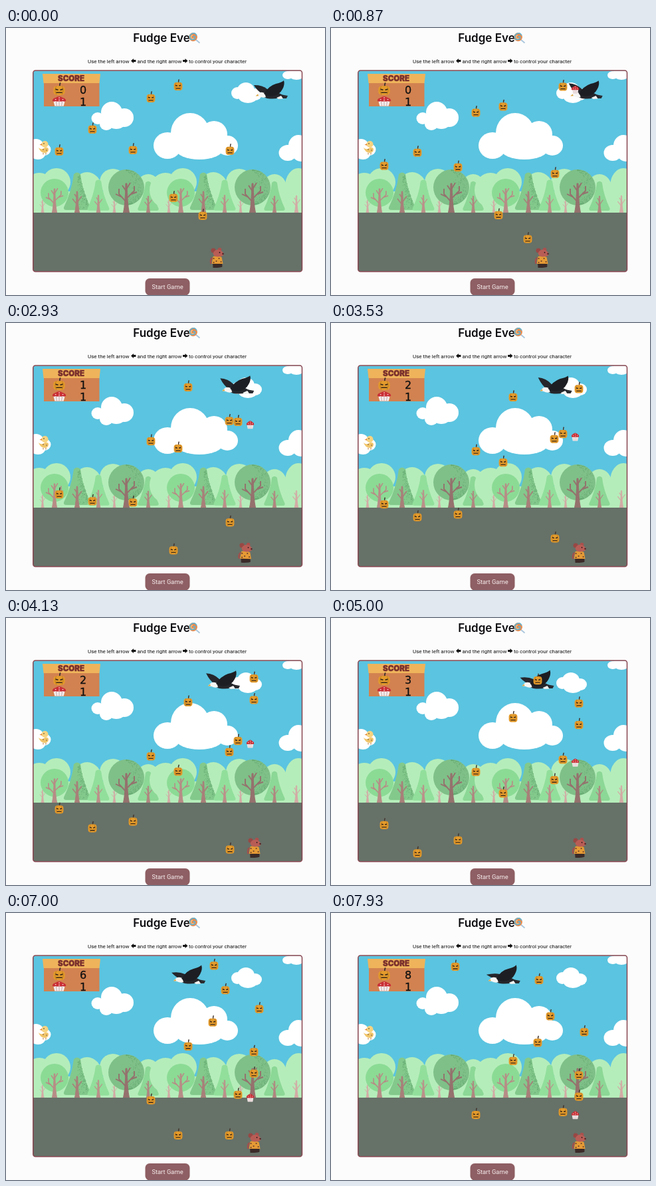
Animation, 480 px wide and 402 px high, one loop 8000 ms. Source, as an HTML page:

```html
<!DOCTYPE html>
<html lang="en">
<head>
<meta charset="utf-8">
<title>Fudge Eve</title>
<style>
  html, body { margin: 0; width: 100%; height: 100%; overflow: hidden; background: #fcfcfc; }
  svg { display: block; width: 100%; height: 100%; }
  .ui { font-family: Roboto, Arial, sans-serif; font-size: 8px; fill: #111; }
  .title { font: 600 17px Inter, "DejaVu Sans", sans-serif; fill: #0c0c10; text-anchor: middle; }
  .head { font: 900 11.5px Inter, "DejaVu Sans", sans-serif; fill: #7a2f2c; stroke: #7a2f2c; stroke-width: .4; text-anchor: middle; }
  .num { font: 16px "DejaVu Sans", sans-serif; fill: #111; stroke: #111; stroke-width: .3; text-anchor: middle; }
  .btn { font: 9.4px Roboto, Arial, sans-serif; fill: #f7eeee; text-anchor: middle; }
</style>
</head>
<body>
<svg viewBox="0 0 480 402" preserveAspectRatio="none">
  <defs>
    <clipPath id="view"><rect x="41" y="64.5" width="404" height="302" rx="3"/></clipPath>
    <g id="pumpkin">
      <path d="M.6-4Q.3-7 1.4-8.6" fill="none" stroke="#43342c" stroke-width="1.5"/>
      <rect x="-6.4" y="-4.3" width="12.8" height="12.2" rx="4" fill="#e39b2b"/>
      <path d="M-3.2-4Q-6 2-3 7.6M3.2-4Q6 2 3 7.6" fill="none" stroke="#bb761d" stroke-width=".7"/>
      <path d="M-4.2-.6L-.9.5-1.2 1.8-4 1.2zM4.2-.6L.9.5 1.2 1.8 4 1.2zM-3.4 4.2H3.4V5.5H-3.4z" fill="#3a2818"/>
    </g>
    <g id="cupcake">
      <path d="M-5-1H5L3.7 6.2H-3.7z" fill="#f6eeee"/>
      <path d="M-2.6-.5L-2 6M0-.5V6M2.6-.5L2 6" stroke="#c9a9aa" stroke-width=".6"/>
      <path d="M-5.6 0Q-6-3-3-4.2Q0-7.4 3-4.2Q6-3 5.6 0Q4.2 1.3 2.8 0Q1.4 1.3 0 0Q-1.4 1.3-2.8 0Q-4.2 1.3-5.6 0z" fill="#c92e35"/>
      <path d="M-3-2h.1M0-4h.1M3-2h.1M0-1.3h.1" stroke="#ffe5df" stroke-width="1.1" stroke-linecap="round"/>
    </g>
    <g id="trunk">
      <path d="M-4.5 0Q-1.6-12-1-44H1Q1.6-12 4.5 0z"/>
      <path d="M0-16L-11-28V-36M0-21L12-33V-40M-6-23L-16-28M7-28L16-31M0-32L-6-41M0-35L6-45" fill="none" stroke-width="1.9"/>
    </g>
    <g id="twig">
      <path d="M-3.6 0Q-1.2-8-.8-32H.8Q1.2-8 3.6 0z"/>
      <path d="M0-12L-7-21M0-15L7-25M0-22L-4-28" fill="none" stroke-width="1.5"/>
    </g>
    <path id="cone" d="M-20-8Q-8-33-5-58Q0-63 5-58Q8-33 20-8Q21-4 16-4H-16Q-21-4-20-8z"/>
  </defs>

  <text class="title" x="234" y="21">Fudge Eve</text>
  <path d="M285 17L291.500 22.500" stroke="#a9c6dc" stroke-width="1.8"/>
  <circle cx="281.500" cy="13.500" r="6.400" fill="#e88a4c"/>
  <path d="M281.500 13.500q2-2 3 .5t-3 3.300t-5-2.800t3.500-6t7 3" fill="none" stroke="#5bb5d8" stroke-width="1.6"/>
  <path d="M281 11q-3 0-2.500 3t4 1.500" fill="none" stroke="#f6d9a4" stroke-width="1"/>

  <g class="ui">
    <text x="123" y="52.500">Use the left arrow</text>
    <text x="197.500" y="52.500">and the right arrow</text>
    <text x="275" y="52.500">to control your character</text>
    <path d="M188 49.500l4-3.400v2h3.400v2.800h-3.400v2zM273.500 49.500l-4-3.400v2h-3.400v2.800h3.400v2z"/>
  </g>

  <g clip-path="url(#view)">
    <rect x="40" y="64" width="406" height="215" fill="#5bc4e0"/>
    <g id="clouds" fill="#fff"></g>
    <g id="chick">
      <path d="M49 180Q53 184 57 181Q62 178 64 182Q64 188 58 188Q51 187 49 180z" fill="#f1c66b"/>
      <circle cx="58.500" cy="175" r="5" fill="#f6d480"/>
      <path d="M54 174l-3.500 1.800 3.700 1.200z" fill="#e58b3d"/>
      <circle cx="57" cy="174" r=".8" fill="#403020"/>
      <path d="M56 188v2.500M60 188v2.500" stroke="#b77a38"/>
      <path d="M55 183h2M60 184h2" stroke="#7a5b45" stroke-width="1.2"/>
    </g>
    <g id="wood"></g>
    <rect x="40" y="278" width="406" height="89" fill="#667168"/>

    <path d="M55 69H142L140.500 83H56.500z" fill="#efb45b"/>
    <rect x="57" y="83" width="83.500" height="35" fill="#d28250"/>
    <text class="head" x="98" y="80.300" textLength="0">SCORE</text>
    <use href="#pumpkin" transform="translate(80 92) scale(1.35 1.1)"/>
    <use href="#cupcake" transform="translate(80 110) scale(1.8 1.2)"/>
    <text class="num" id="score" x="116" y="99">0</text>
    <text class="num" x="116" y="116.500">1</text>

    <g id="eagle">
      <path id="farWing" fill="#25262b"/>
      <path d="M40 22L51 24 49 28 38 28z" fill="#2b2c31"/>
      <path d="M9 20Q20 14 31 18Q40 20 46 25Q34 30 20 28Q12 26 9 20z" fill="#25262b"/>
      <path d="M16 20Q9 17 6 21L3 24 8 25Q14 28 18 26z" fill="#f6f6f4"/>
      <path d="M6 21.500L2.500 24.500 7 24.300z" fill="#dda63d"/>
      <path d="M34 27L41 24 44 28.500 37 29z" fill="#f1f1ef"/>
      <path id="nearWing" fill="#1d1e23"/>
    </g>

    <g id="hero">
      <path d="M-6.500 23H7.500L8 28Q8 30-6 30z" fill="#3a2a28"/>
      <path d="M-6 13Q1 11 7 14L9 24H-8z" fill="#e59a35"/>
      <path d="M-5 16h.1M-1 20h.1M3 16h.1M6 21h.1M-5 22h.1" stroke="#67402c" stroke-width="2" stroke-linecap="round"/>
      <path d="M-7 15Q-11 18-9 24" fill="none" stroke="#a34f4b" stroke-width="2.400"/>
      <circle cx="-5.500" cy="4" r="3.600" fill="#984845"/>
      <circle cx="4" cy="2.500" r="2.800" fill="#a9514d"/>
      <path d="M-6 8Q-3 2 3 3Q8 4 10 9Q10 12 5 13Q-5 15-6 8z" fill="#b85d56"/>
      <circle cx="9" cy="9" r="1.300" fill="#4b2728"/>
      <circle cx="4" cy="7" r=".9" fill="#2c191b"/>
    </g>
    <g id="drops"></g>
  </g>
  <rect x="40.800" y="64" width="404.700" height="302.700" rx="3.500" fill="none" stroke="#87454f" stroke-width="1.500"/>

  <rect x="209.500" y="377" width="67" height="25.500" rx="6.500" fill="#8e5f64"/>
  <text class="btn" x="243" y="393">Start Game</text>
</svg>

<script>
const $ = id => document.getElementById(id);
const LOOP = 8000, STEP = LOOP / 120, FLOOR = 357;

// Scenery
const puffs = [
  [348, 98, 9, 9], [361, 94, 13, 12], [375, 100, 10, 9], [364, 104, 14, 9],
  [424, 71, 8, 6], [437, 69, 13, 9],
  [138, 136, 9.500, 9], [159, 127, 16, 16], [178, 135, 14, 14], [151, 145, 10, 9], [166, 142, 14, 10],
  [243, 177, 21, 20], [277, 158, 29, 30], [313, 160, 20, 20], [333, 177, 16, 15], [291, 182, 36, 16],
  [424, 188, 13.500, 12], [440, 177, 15, 16], [445, 190, 14, 11],
  [45, 181, 13, 14], [58, 183, 9.500, 9], [48, 190, 11, 8]
];
const oval = ([x, y, a, b]) => `<ellipse cx="${x}" cy="${y}" rx="${a}" ry="${b}"/>`;
$('clouds').innerHTML = puffs.map(oval).join('');

let seed = 7;
const rnd = () => (seed = seed * 16807 % 2147483647) / 2147483647;

// Soft stipple along the shaded side of a crown
function stipple(n, width) {
  let d = '';
  for (let i = 0; i < n; i++) {
    const v = rnd(), [x, y] = width(v);
    d += `M${(x * Math.sqrt(rnd())).toFixed(1)} ${y.toFixed(1)}h.1`;
  }
  return `<path d="${d}" stroke="#64a870" stroke-width=".9" stroke-linecap="round"/>`;
}
const roundDots = stipple(190, v => [26 * Math.sin(Math.PI * v), -38 - 26 * Math.cos(Math.PI * v)]);
const coneDots = stipple(130, v => [4 + 15 * v, -56 + 50 * v]);

const at = (x, s, body) => `<g transform="translate(${x} 278) scale(${s})">${body}</g>`;
const wood = (id, color) => `<use href="#${id}" fill="${color}" stroke="${color}"/>`;
const cone = color => `<use href="#cone" fill="${color}"/>`;

function grove(x) {
  const back = [[50, 244, 24, 26], [76, 232, 21, 21], [122, 242, 22, 25], [161, 232, 20, 20], [214, 243, 19, 23]];
  return `<g transform="translate(${x})"><g fill="#b5edba">${back.map(oval).join('')}</g></g>`
    + at(x + 55, .6, wood('twig', '#d3aaa5'))
    + at(x + 163, .6, wood('twig', '#d3aaa5'))
    + at(x + 107, 1, cone('#83c98c') + coneDots + wood('twig', '#a87f79'))
    + at(x + 139, .82, cone('#91df9b') + wood('twig', '#bb908a'))
    + at(x + 214, .78, cone('#8cd896') + wood('twig', '#b08680'))
    + at(x + 73, 1, '<circle cy="-30" r="21" fill="#8bdb95"/><g transform="scale(.82)">' + wood('trunk', '#b78c86') + '</g>')
    + at(x + 181, 1, '<circle cy="-38" r="27" fill="#7fc088"/>' + roundDots + wood('trunk', '#95716d'));
}
$('wood').innerHTML = '<rect x="40" y="246" width="406" height="33" fill="#b5edba"/>'
  + grove(0) + grove(190) + `<g fill="#b5edba">${oval([440, 238, 20, 27])}</g>`
  + at(437, .8, wood('twig', '#d3aaa5'));

// Falling things: x, start y, px per ms, start time
const rate = [.0252, .0302, .0353, .0403, .0453];
const first = [
  [259, 86, 2], [218, 104, 0], [130, 151, 3], [80, 184, 0],
  [191, 182, 1], [337, 183, 3], [252, 254, 1], [296, 281, 3]
].map(([x, y, r]) => ({ x, y, v: rate[r], t0: 0 }));
const later = [
  [349, 1], [336, 4], [274, 0], [373, 3], [373, 3],
  [311, 2], [381, 3], [330, 4], [313, 0], [187, 0]
].map(([x, r], k) => ({ x, y: 77, v: rate[r], t0: 545 + 804 * k }));
const pumpkins = first.concat(later);
const drops = pumpkins.concat({ x: 367.500, y: 74, v: rate[1], t0: 245, cake: true });

for (const d of drops) {
  d.el = document.createElementNS('http://www.w3.org/2000/svg', 'use');
  d.el.setAttribute('href', d.cake ? '#cupcake' : '#pumpkin');
  $('drops').append(d.el);
}

const move = (el, x, y, extra = '') =>
  el.setAttribute('transform', `translate(${x.toFixed(2)} ${y.toFixed(2)}) ${extra}`);

function draw(t) {
  let score = 0;
  for (const d of drops) {
    const y = d.y + d.v * (t - d.t0), gone = y >= FLOOR;
    if (gone && !d.cake) score++;
    d.el.style.display = t < d.t0 || gone ? 'none' : '';
    move(d.el, d.x, y);
  }
  $('score').textContent = score;

  const flap = Math.cos((t - 1800) / (LOOP / 12) * 2 * Math.PI);
  move($('eagle'), 373 - .0177 * t, 78);
  $('farWing').setAttribute('d', `M0 ${10 + 6 * flap}Q12 ${9 + 4 * flap} 20 14L30 22 14 22Q6 ${18 + flap} 0 ${10 + 6 * flap}z`);
  $('nearWing').setAttribute('d', `M15 21Q22 ${9 - flap} 33 6Q42 4 45 ${.8 - .6 * flap}Q47 7 43 14Q39 22 30 24Q21 26 15 21z`);

  const walk = Math.min(Math.max(t - 1160, 0), 2260);
  const walking = walk > 0 && walk < 2260;
  const tilt = walking ? 4 * Math.sin(t / 90) : 0;
  move($('hero'), 317.500 + .0248 * walk, 331, `rotate(${tilt.toFixed(1)} 0 29)`);
}

function tick(now) {
  const t = now % LOOP;
  draw(Math.floor((t + 1) / STEP) * STEP);
  requestAnimationFrame(tick);
}
document.querySelector('.head').removeAttribute('textLength');
const start = performance.now();
draw(0);
requestAnimationFrame(function loop() {
  tick.t = performance.now() - start;
  draw(Math.floor((tick.t % LOOP + 1) / STEP) % 120 * STEP);
  requestAnimationFrame(loop);
});
</script>
</body>
</html>
```
